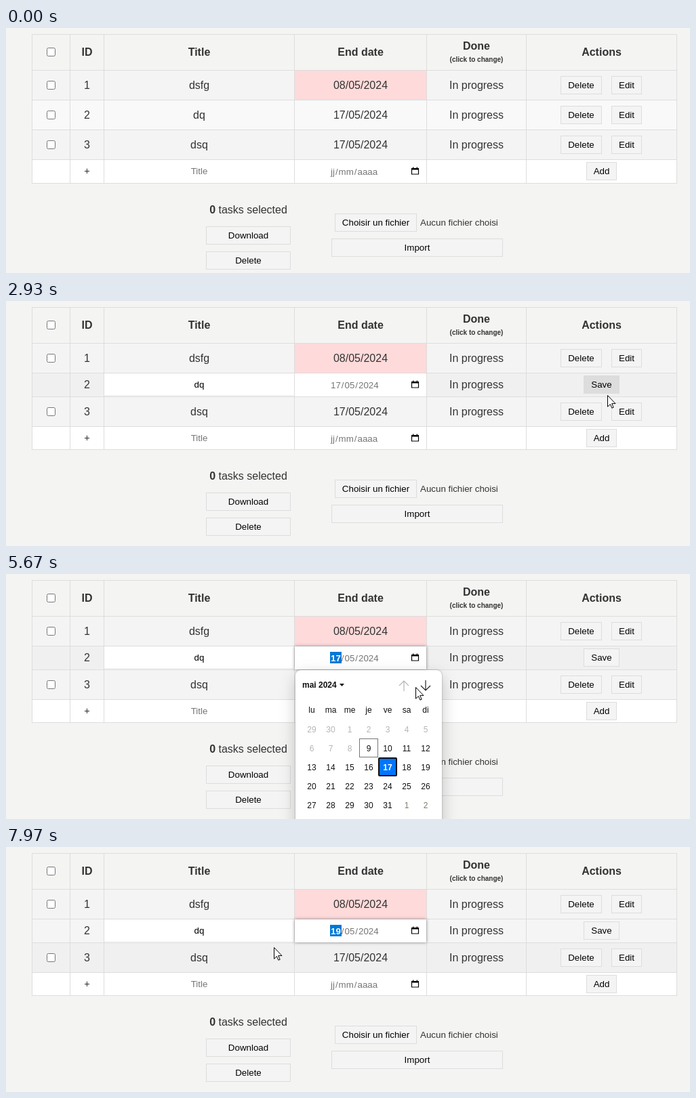
An HTML page for the animation above (7990 ms loop, 1009x362 px).

```html
<!DOCTYPE html>
<html lang="en">
<head>
<meta charset="utf-8">
<title>Task table</title>
<style>
  html, body { margin: 0; width: 100%; height: 100%; overflow: hidden; background: #f4f4f2; }
  svg { display: block; font-family: "Liberation Sans", Arial, sans-serif; }
  .focus { filter: drop-shadow(0 0 2.5px rgba(0, 0, 0, .4)); }
  .panel { filter: drop-shadow(0 8px 12px rgba(0, 0, 0, .16)) drop-shadow(0 0 1px rgba(0, 0, 0, .35)); }
</style>
</head>
<body>
<svg id="stage" width="1009" height="362" viewBox="0 0 1009 362"></svg>
<script>
const LOOP = 7990;
const COLS = [38, 94, 144, 425, 620, 767, 989];
const VIEW = [9, 62, 106, 150, 194, 229];
const EDIT = [9, 62, 106, 141, 185, 219];
const INK = '#333', GRAY = '#757575', PLAIN = '#f4f4f4', HOVER = '#f0f0f0';

// Pointer strokes: start, end, number of steps, then evenly timed points.
const STROKES = [
  [200, 980, 12, [952, 350], [947, 290], [947, 240], [950, 199]],
  [1000, 1780, 12, [950, 197], [944, 180], [930, 155], [921, 143]],
  [1800, 2120, 5, [921, 142], [918, 136], [914, 129]],
  [2440, 3150, 11, [914, 129], [900, 128], [889, 137], [866, 158]],
  [3250, 3990, 14, [862, 162], [780, 180], [690, 176], [605, 158]],
  [4090, 4310, 4, [603, 150], [597, 137]],
  [4610, 5290, 14, [595, 134], [603, 124], [604, 124]],
  [5450, 6230, 12, [604, 128], [604, 176], [601, 215], [594, 250]],
  [6330, 6970, 12, [594, 254], [600, 270], [613, 286]],
  [7130, 7870, 11, [613, 286], [600, 255], [530, 200], [442, 162]],
  [7970, 7990, 1, [395, 148]]
];
const CLICKS = [[2440, 2520], [4890, 5000], [7130, 7210]];

const rect = (x, y, w, h, fill, extra = '') =>
  `<rect x="${x}" y="${y}" width="${w}" height="${h}" fill="${fill}" ${extra}/>`;
const text = (x, y, s, size = 16, fill = INK, extra = '') =>
  `<text x="${x}" y="${y}" font-size="${size}" fill="${fill}" text-anchor="middle" ${extra}>${s}</text>`;
const left = (x, y, s, size, fill, extra = '') =>
  `<text x="${x}" y="${y}" font-size="${size}" fill="${fill}" ${extra}>${s}</text>`;
const bold = 'font-weight="700"';
const SMALL = 13.333;

const button = (x, y, w, label, extra = '') =>
  rect(x + .5, y + .5, w - 1, 26, PLAIN, `stroke="#ddd" ${extra}`) +
  text(x + w / 2, y + 18, label, SMALL, '#000');

const checkbox = y => rect(60.5, y - 6, 12, 12, '#fff', 'rx="2" stroke="#767676"');

const calendarIcon = y =>
  `<path d="M598.5 ${y - 3.5}h10v8h-10z" fill="none" stroke="#000" stroke-width="1.2"/>` +
  rect(598, y - 4.5, 11, 2.5, '#000') + rect(600, y - 6, 1.3, 2, '#000') + rect(605.7, y - 6, 1.3, 2, '#000');

// Each date field has one pixel of padding on both sides.
function dateField(y, parts, widths) {
  let x = 478, out = '';
  parts.forEach((p, i) => {
    out += left(x + 1, y + 5, p, SMALL, GRAY, i ? '' : 'class="day"');
    x += widths[i] + 2;
    if (i < 2) out += left(x, y + 5, '/', SMALL, GRAY);
    x += 3.7;
  });
  return out + calendarIcon(y);
}

function table(ys, editing) {
  const mid = i => Math.floor((ys[i] + ys[i + 1]) / 2);
  let s = '';
  for (let i = 1; i < 5; i++)
    s += rect(38, ys[i], 952, ys[i + 1] - ys[i], i == 4 ? '#fff' : PLAIN, `class="row${i}"`);
  s += rect(426, 63, 194, 43, '#ffdada');
  if (editing) s += rect(145, 107, 280, 32, '#fff') + rect(426, 107, 194, 34, '#fff');
  for (const x of COLS) s += rect(x, 9, 1, ys[5] - 8, '#ddd');
  for (const y of ys) s += rect(38, y, 952, 1, '#ddd');

  s += checkbox(35.5) + text(119.5, 41, 'ID', 16, INK, bold) + text(285, 41, 'Title', 16, INK, bold) +
    text(523, 41, 'End date', 16, INK, bold) + text(694, 32, 'Done', 16, INK, bold) +
    text(694, 50, '(click to change)', 10, INK, bold) + text(878.5, 41, 'Actions', 16, INK, bold);

  [['dsfg', '08/05/2024'], ['dq', '17/05/2024'], ['dsq', '17/05/2024']].forEach(([name, date], k) => {
    const y = mid(k + 1), edited = editing && k == 1;
    s += text(119.5, y + 6, k + 1) + text(694, y + 6, 'In progress');
    if (edited) {
      s += text(285, y + 5, name, SMALL, '#000') + button(852, 110, 53, 'Save', 'id="save"') +
        `<g id="focus">${rect(426, 107, 194, 34, '#fff', 'class="focus"')}${rect(478, 115, 17, 17, '#0078d7')}</g>` +
        dateField(y + .5, ['17', '05', '2024'], [14.8, 14.8, 29.7]);
    } else {
      s += checkbox(y + .5) + text(285, y + 6, name) + text(523, y + 6, date) +
        button(818, y - 13, 61, 'Delete') + button(893, y - 13, 45, 'Edit', !editing && k == 1 ? 'id="edit"' : '');
    }
  });

  const y = mid(4), d = ys[5] - 229;
  s += text(119.5, y + 5, '+', 14.5) + text(285, y + 5, 'Title', SMALL, GRAY) +
    dateField(y + .5, ['jj', 'mm', 'aaaa'], [5.9, 22.2, 29.7]) + button(856, y - 13, 45, 'Add');
  s += text(357.5, 274 + d, `<tspan ${bold}>0</tspan> tasks selected`) +
    button(295, 293 + d, 125, 'Download') + button(295, 330 + d, 125, 'Delete') +
    button(485, 274 + d, 121, 'Choisir un fichier') + left(611, 292 + d, 'Aucun fichier choisi', SMALL, INK) +
    button(480, 311 + d, 253, 'Import');
  return s;
}

function picker() {
  let s = rect(427, 142, 216, 250, '#fff', 'rx="8" class="panel"') +
    left(437, 168, 'mai 2024', 12, '#101010', bold) +
    '<path d="M492 162h7l-3.5 4z" fill="#101010"/>' +
    '<path d="M587 173v-15m-7 7l7-7l7 7" fill="none" stroke="#b5b5b5" stroke-width="1.2"/>' +
    '<path d="M619 157v15m-7-7l7 7l7-7" fill="none" stroke="#222" stroke-width="1.2"/>' +
    rect(0, 0, 27, 27, '#b2d6ff', 'id="cell" rx="1" stroke="#101010"') +
    rect(521.5, 243.5, 27, 27, 'none', 'stroke="#767676"') +
    rect(550, 272, 26, 26, '#0075ff', 'stroke="#101010" stroke-width="2" rx="1"');
  ['lu', 'ma', 'me', 'je', 've', 'sa', 'di'].forEach((n, i) => s += text(451 + 28 * i, 205, n, 12, '#101010'));
  for (let i = 0; i < 35; i++) {
    const n = i - 1, label = n < 1 ? n + 30 : n > 31 ? n - 31 : n;
    const fill = n < 9 ? '#b5b5b5' : n > 31 ? '#807a6c' : n == 17 ? '#fff' : '#101010';
    s += text(451 + 28 * (i % 7), 234 + 28 * Math.floor(i / 7), label, 12, fill, n == 17 ? bold : '');
  }
  return s;
}

const stage = document.getElementById('stage');
stage.innerHTML =
  `<g id="view">${table(VIEW, false)}</g><g id="editor">${table(EDIT, true)}</g><g id="picker">${picker()}</g>` +
  `<g id="pointer"><circle id="press" cy="2" r="12" fill="#f0e000" opacity=".55"/>
   <path id="arrow" d="M.5.5V17.2L4.4 13.5L6.9 19.2L9.2 18.2L6.7 12.6H12z" fill="#fff" stroke="#000"/>
   <g id="hand" transform="translate(-6 -1)" fill="#fff" stroke="#000" stroke-width="1.1" stroke-linejoin="round">
     <path d="M5 14.5V2.5a1.6 1.6 0 0 1 3.2 0V9a1.5 1.5 0 0 1 3 .3a1.5 1.5 0 0 1 3 .7a1.4 1.4 0 0 1 2.6 1V17c0 2-1.5 3-1.5 6.5H6.5C6 20.500 3 17.500 1 14c-.8-1.400 1-2.600 2.200-1.400z"/>
     <path d="M8.200 9v4M11.200 9.500v3.500M14.200 10.500v3" fill="none"/>
   </g></g>`;

const $ = id => document.getElementById(id);
const show = (id, on) => $(id).setAttribute('display', on ? 'inline' : 'none');
const within = (t, a, b) => t >= a && t < b;

function pointerAt(t) {
  const stroke = STROKES.filter(s => s[0] <= t).pop();
  if (!stroke) return null;
  const [start, end, steps, ...pts] = stroke;
  const n = Math.max(1, steps - 1);
  const f = Math.min(1, Math.floor((t - start) / (end - start) * n + .15) / n);
  const p = f * (pts.length - 1), i = Math.floor(p), u = p - i;
  const a = pts[i], b = pts[i + 1] || a;
  return [a[0] + (b[0] - a[0]) * u, a[1] + (b[1] - a[1]) * u];
}

function draw(t) {
  const editing = t >= 2520, open = within(t, 5000, 7280);
  const pos = pointerAt(t);
  const [x, y] = pos || [0, 999];
  show('view', !editing);
  show('editor', editing);
  show('picker', open);
  show('focus', t >= 4890);

  const ys = editing ? EDIT : VIEW, scene = $(editing ? 'editor' : 'view');
  for (let i = 1; i < 4; i++) {
    const hot = open ? i == 2 : within(y, ys[i], ys[i + 1]);
    const base = i == 2 ? (editing ? '#f5f5f5' : '#f9f9f9') : PLAIN;
    scene.querySelector('.row' + i).setAttribute('fill', hot ? HOVER : base);
  }
  $('edit').setAttribute('fill', within(t, 1860, 2520) ? '#ddd' : PLAIN);
  $('save').setAttribute('fill', within(t, 2600, 3000) ? '#ddd' : PLAIN);

  const day = $('editor').querySelector('.day');
  day.textContent = t < 7280 ? '17' : '19';
  day.setAttribute('fill', t >= 4890 ? '#fff' : GRAY);
  day.setAttribute('font-weight', t >= 4890 ? 700 : 400);

  show('cell', open && y >= 243);
  $('cell').setAttribute('x', 437.5 + 28 * Math.floor((x - 437) / 28));
  $('cell').setAttribute('y', 243.5 + 28 * Math.floor((y - 243) / 28));

  show('pointer', pos);
  $('pointer').setAttribute('transform', `translate(${Math.round(x)} ${Math.round(y)})`);
  const hand = within(t, 1640, 2900);
  show('hand', hand);
  show('arrow', !hand);
  show('press', CLICKS.some(([a, b]) => within(t, a, b)));
}

const began = performance.now();
function tick() {
  draw((performance.now() - began) % LOOP);
  requestAnimationFrame(tick);
}
tick();
</script>
</body>
</html>
```
